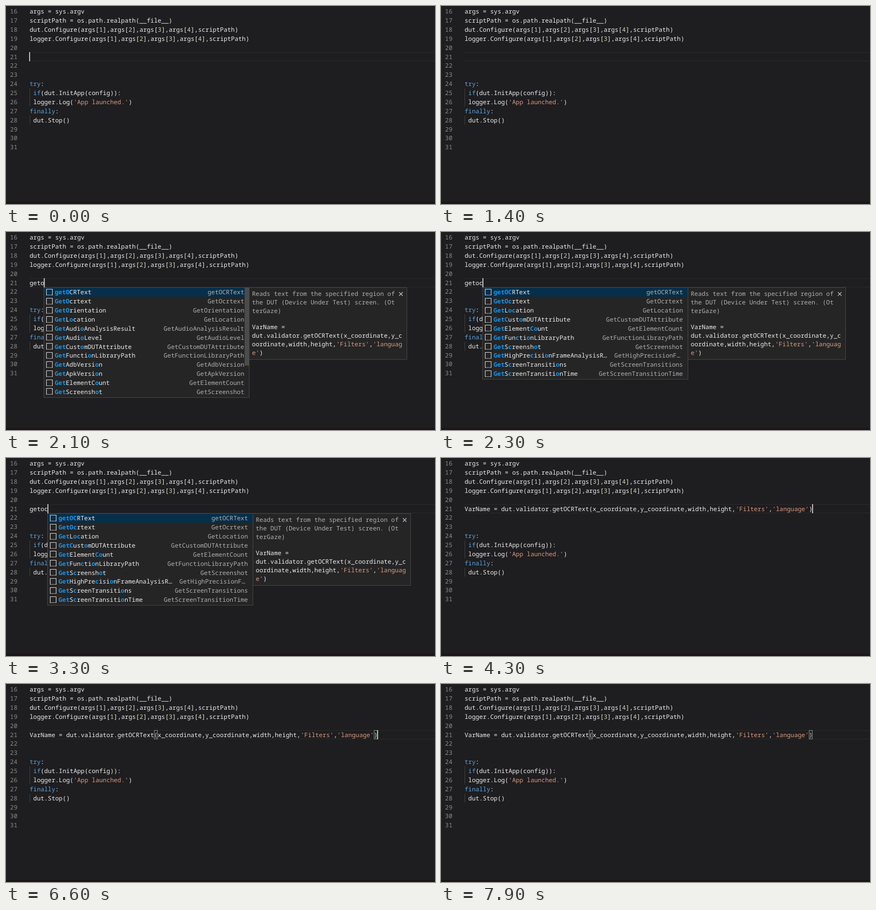
An HTML page with a canvas for the animation above (8000 ms loop, 800x369 px).

```html
<!DOCTYPE html>
<html lang="en">
<head>
<meta charset="utf-8">
<title>Code completion</title>
<style>
  html, body { margin: 0; width: 100%; height: 100%; overflow: hidden; background: #1e1d1f; }
  canvas { display: block; width: 800px; height: 369px; }
</style>
</head>
<body>
<canvas id="stage"></canvas>
<script>
const W = 800, H = 369, LOOP = 8000;
const CHAR = 6.83, LINE = 16.87, LEFT = 44, TOP = 1.8, BASE = 12.4;
const FONT = `${CHAR / 0.6}px "Noto Sans Mono", "DejaVu Sans Mono", monospace`;
const COLOR = {
  bg: '#1e1d1f', text: '#eeeeee', dim: '#b0b0b0', number: '#8c8c8c', panel: '#252526',
  border: '#454545', keyword: '#5ba5e0', string: '#d99a80', digit: '#c3dcb6', match: '#1496ee', icon: '#d0d0d0'
};

const CODE = [
  'args = sys.argv',
  'scriptPath = os.path.realpath(__file__)',
  'dut.Configure(args[1],args[2],args[3],args[4],scriptPath)',
  'logger.Configure(args[1],args[2],args[3],args[4],scriptPath)',
  '', '', '', '',
  'try:',
  ' if(dut.InitApp(config)):',
  " logger.Log('App launched.')",
  'finally:',
  ' dut.Stop()',
  '', '', ''
];
const CALL = "VarName = dut.validator.getOCRText(x_coordinate,y_coordinate,width,height,'Filters','language')";
const ACTIVE = 5;

// Text on the active line and the time it appears
const TYPING = [[0, ''], [1700, 'g'], [1800, 'ge'], [2000, 'get'], [2100, 'geto'], [2200, 'getoc'], [4200, CALL]];

const COMMON = 'GetAdbAPIVersion GetAdbVersion GetAllAttributeValues GetAllChildAttributeValu… GetApkVersion ' +
  'GetAttribute GetAudioAnalysisResult GetAudioLevel GetCustomDUTAttribute GetDeviceHeight';
const LISTS = {
  ge: 'getOCRText GeneratorExit ' + COMMON,
  get: 'getOCRText ' + COMMON + ' GetDeviceWidth',
  geto: 'getOCRText GetOcrtext GetOrientation GetLocation GetAudioAnalysisResult GetAudioLevel ' +
    'GetCustomDUTAttribute GetFunctionLibraryPath GetAdbVersion GetApkVersion GetElementCount GetScreenshot',
  getoc: 'getOCRText GetOcrtext GetLocation GetCustomDUTAttribute GetElementCount GetFunctionLibraryPath ' +
    'GetScreenshot GetHighPrecisionFrameAnalysisR… GetScreenTransitions GetScreenTransitionTime'
};
const SHORT = {
  'GetAllChildAttributeValu…': 'GetAllChildAttributeVa…',
  'GetHighPrecisionFrameAnalysisR…': 'GetHighPrecisionF…',
  GeneratorExit: ''
};
const ABOUT = [
  'Reads text from the specified region of',
  'the DUT (Device Under Test) screen. (Ot',
  'terGaze)'
];

const canvas = document.getElementById('stage');
const ctx = canvas.getContext('2d');
const ratio = window.devicePixelRatio || 1;
canvas.width = W * ratio;
canvas.height = H * ratio;
ctx.scale(ratio, ratio);
ctx.textRendering = 'geometricPrecision';

function rect(x, y, w, h, color) {
  ctx.fillStyle = color;
  ctx.fillRect(x, y, w, h);
}

function frame(x, y, w, h, color) {
  ctx.strokeStyle = color;
  ctx.lineWidth = 1;
  ctx.strokeRect(x + 0.5, y + 0.5, w - 1, h - 1);
}

function path(points, color, width) {
  ctx.strokeStyle = color;
  ctx.lineWidth = width;
  ctx.beginPath();
  points.forEach(([x, y], i) => i ? ctx.lineTo(x, y) : ctx.moveTo(x, y));
  ctx.stroke();
}

function write(text, x, y, color, weight = 500) {
  ctx.font = `${weight} ${FONT}`;
  ctx.fillStyle = color;
  ctx.fillText(text, x, y);
}

function tokenColor(token) {
  if (token[0] === "'") return COLOR.string;
  if (/^\d+$/.test(token)) return COLOR.digit;
  return /^(try|finally|if)$/.test(token) ? COLOR.keyword : COLOR.text;
}

function writeCode(text, x, y) {
  let col = 0;
  for (const token of text.split(/('[^']*'|\b\d+\b|\b(?:try|finally|if)\b)/)) {
    write(token, x + col * CHAR, y, tokenColor(token));
    col += token.length;
  }
}

const rowTop = row => TOP + row * LINE;

function drawEditor(typed) {
  rect(0, 0, W, H, COLOR.bg);
  rect(0, 365, W, 4, '#1b1518');
  rect(LEFT, 86, W - LEFT, 1, '#2a2a2a');
  rect(LEFT, 102, W - LEFT, 1, '#2a2a2a');
  rect(LEFT, rowTop(9), 1, LINE * 2, '#404040');
  rect(LEFT, rowTop(12), 1, LINE, '#404040');
  CODE.forEach((line, row) => {
    const y = rowTop(row) + BASE;
    write(String(16 + row), 7.6, y, COLOR.number, 400);
    writeCode(row === ACTIVE ? typed : line, LEFT, y);
  });
}

function drawBrackets() {
  for (const col of [CALL.indexOf('('), CALL.length - 1]) {
    const x = Math.floor(LEFT + col * CHAR);
    rect(x, 86, 7, 17, 'rgba(0,100,0,0.1)');
    frame(x, 86, 7, 17, '#888888');
  }
}

// Columns of the label that match the typed word in order
function matchColumns(label, word) {
  const cols = [];
  let from = 0;
  for (const c of word) {
    const at = label.toLowerCase().indexOf(c, from);
    if (at < 0) return null;
    cols.push(at);
    from = at + 1;
  }
  return cols;
}

const swapEnd = word => word.slice(0, -2) + word.slice(-1) + word.slice(-2, -1);

function snippetIcon(x, y) {
  path([[x + 0.5, y + 12], [x + 0.5, y + 0.5], [x + 11.5, y + 0.5], [x + 11.5, y + 12]], COLOR.icon, 1.1);
  for (let i = 0; i < 4; i++) rect(x + 0.5 + i * 3, y + 11, 2, 1, COLOR.icon);
}

function classIcon(x, y) {
  const color = '#e0a04e';
  path([[x + 1, y + 5], [x + 4, y + 1.5], [x + 6.5, y + 3.5], [x + 3.5, y + 7], [x + 1, y + 5]], color, 1.3);
  path([[x + 5.5, y + 4.5], [x + 9, y + 4.5]], color, 1.1);
  path([[x + 6.5, y + 4.5], [x + 6.5, y + 9], [x + 9, y + 9]], color, 1.1);
  for (const dy of [4.5, 9]) {
    path([[x + 8.5, y + dy], [x + 10, y + dy - 1.7], [x + 11.8, y + dy], [x + 10, y + dy + 1.7], [x + 8.5, y + dy]], color, 1.1);
  }
}

function drawItem(label, word, x, top) {
  const y = top + BASE;
  const textX = x + 21;
  (label === 'GeneratorExit' ? classIcon : snippetIcon)(x + 5, Math.floor(top + 2.5));
  const hits = matchColumns(label, word) || matchColumns(label, swapEnd(word)) || [];
  [...label].forEach((c, i) => {
    const hit = hits.includes(i);
    write(c, textX + i * CHAR, y, hit ? COLOR.match : COLOR.text, hit ? 700 : 500);
  });
  const detail = SHORT[label] ?? label;
  const inset = detail.endsWith('…') ? 5 : 0;
  write(detail, x + 374.3 - inset - detail.length * CHAR, y, COLOR.dim);
}

function drawDocs(x) {
  rect(x, 103, 295, 135, COLOR.panel);
  frame(x, 103, 295, 135, COLOR.border);
  const textX = x + 5.8;
  ABOUT.forEach((line, i) => write(line, textX, 118.8 + i * 16.3, COLOR.dim));
  writeCode('VarName =', textX, 181);
  const call = CALL.slice(10), wrap = 41;
  let col = 0;
  for (const token of call.split(/('[^']*')/)) {
    for (const c of token) {
      write(c, textX + col % wrap * CHAR, 197 + Math.floor(col / wrap) * 16.1, tokenColor(token));
      col++;
    }
  }
  const cx = x + 283.5, cy = 115.5, r = 3.3;
  path([[cx - r, cy - r], [cx + r, cy + r]], COLOR.icon, 1.2);
  path([[cx - r, cy + r], [cx + r, cy - r]], COLOR.icon, 1.2);
}

function drawPopup(word) {
  const items = LISTS[word].split(' ');
  const x = Math.floor(LEFT + word.length * CHAR) - 1, top = 103.9;
  const height = Math.round(items.length * LINE + 3.5);
  drawDocs(x + 383);
  rect(x, 103, 384, height, COLOR.panel);
  rect(x + 1, 104, 382, 16.5, '#062f4a');
  if (word === 'geto') rect(x + 375, 104, 8, 145, '#4b4b4c');
  frame(x, 103, 384, height, COLOR.border);
  items.forEach((label, i) => drawItem(label, word, x, top + i * LINE));
}

function caretOn(t) {
  if (t < 1700) return t < 400 || (t >= 1000 && t < 1400);
  if (t < 2200) return true;
  return Math.floor((t - 2200) / 500) % 2 === 0;
}

function draw(t) {
  const typed = TYPING.filter(([at]) => t >= at).pop()[1];
  drawEditor(typed);
  if (t >= 4400) drawBrackets();
  if (LISTS[typed]) drawPopup(typed);
  if (caretOn(t)) rect(LEFT + typed.length * CHAR - 0.8, 86, 1.7, 17, '#d4d4d2');
}

const start = performance.now();
function tick() {
  draw((performance.now() - start) % LOOP);
  requestAnimationFrame(tick);
}
tick();
</script>
</body>
</html>
```
